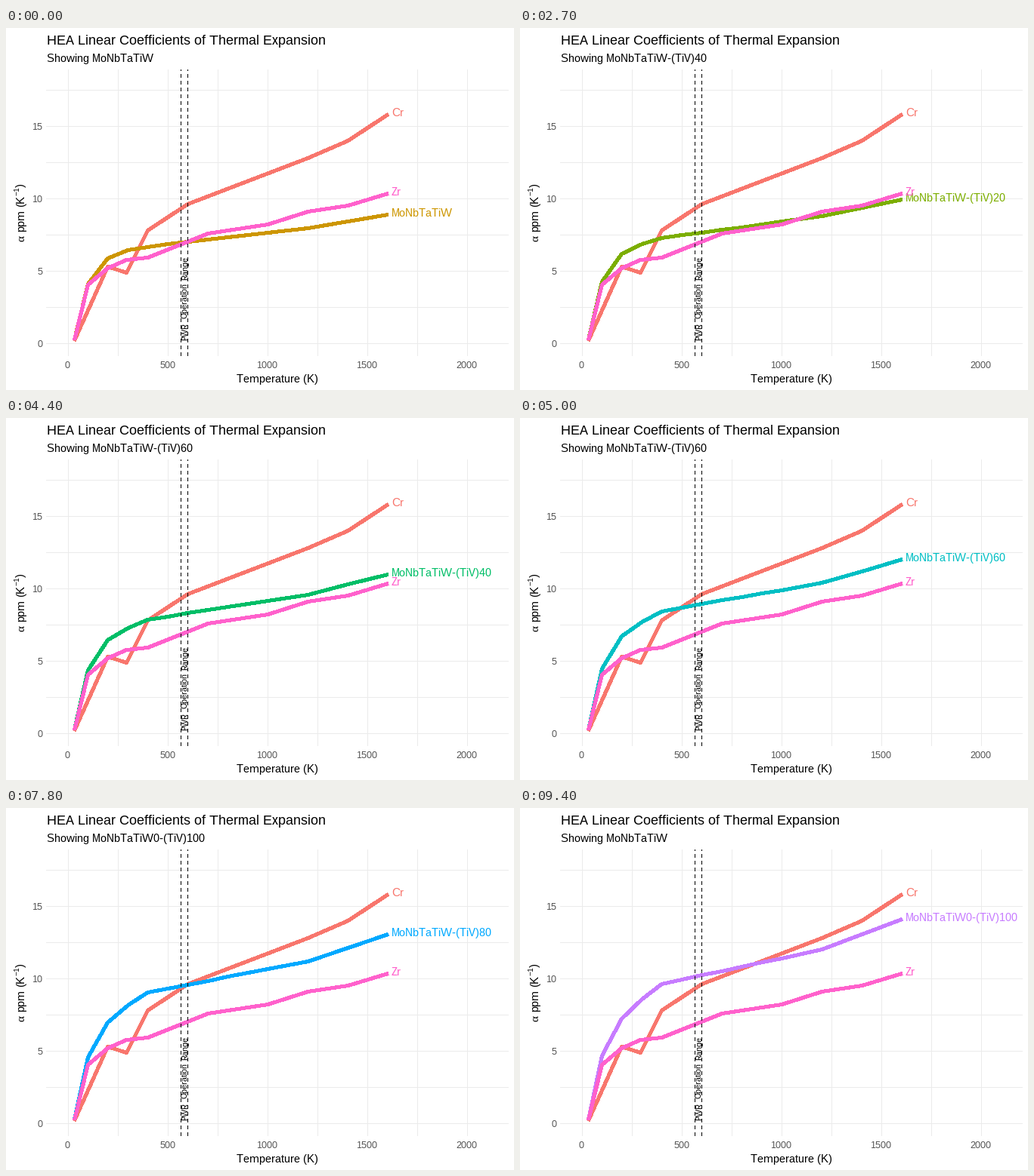
Write a matplotlib script that moves like this. It is 672x480 px and loops after 10000 ms.

```python
import numpy as np
import matplotlib as mpl
import matplotlib.pyplot as plt
from matplotlib.animation import FuncAnimation

mpl.rcParams.update({
    "font.family": "Liberation Sans",
    "text.hinting": "native",
    "text.hinting_factor": 1,
    "text.kerning_factor": 6,
})

W, H, DPI = 672, 480, 96
LEFT, RIGHT, TOP, BOTTOM = 53.8, 664.7, 55, 435
STEP, LOOP = 100, 10000
STAGE, LEAD = 1700, 600  # ms per alloy, and how early the subtitle changes
PX = 72 / DPI            # points per pixel
GREY = "#4D4D4D"

CR = [(30, 0.2), (200, 5.3), (293, 4.9), (400, 7.8),
      (600, 9.6), (1200, 12.8), (1400, 14.0), (1600, 15.8)]
ZR = [(30, 0.25), (100, 4.05), (200, 5.2), (293, 5.75), (400, 5.9),
      (700, 7.6), (1000, 8.2), (1200, 9.1), (1400, 9.5), (1600, 10.35)]

ALLOY_TEMPS = np.r_[30, 100:1001:100, 1200:1601:200]
NAMES = (["MoNbTaTiW"] + [f"MoNbTaTiW-(TiV){p}" for p in range(20, 81, 20)]
         + ["MoNbTaTiW0-(TiV)100"])
COLORS = ["#CD9600", "#7CAE00", "#00BE67", "#00BFC4", "#00A9FF", "#C77CFF"]


def alloy(share):
    """Expansion of the alloy for a TiV share from 0 to 1."""
    t = ALLOY_TEMPS
    rise = t - 30
    hot = np.maximum(0, t - 1200)
    base = 0.25 + 5.85 * (1 - np.exp(-rise / 68)) + 0.0016 * rise + 0.00068 * hot
    gain = (2.95 * np.minimum(1, rise / 370)
            + 0.00135 * np.maximum(0, t - 400) + 0.00163 * hot)
    return base + share * gain


def px_x(kelvin):
    return np.round(LEFT + (np.asarray(kelvin) + 105) / 2310 * (RIGHT - LEFT)) + 0.5


def px_y(alpha):
    return np.round(BOTTOM - (np.asarray(alpha) + 0.9) / 19.8 * (BOTTOM - TOP)) + 0.5


fig = plt.figure(figsize=(W / DPI, H / DPI), dpi=DPI, facecolor="white")
ax = fig.add_axes([0, 0, 1, 1])
ax.set_xlim(0, W)
ax.set_ylim(H, 0)
ax.axis("off")


def text(x, y, s, size, color="black", z=6, **kw):
    """Place text by its baseline, with the size in pixels."""
    return ax.text(x, y, s, fontsize=size * PX, color=color, zorder=z,
                   va="baseline", rotation_mode="anchor", **kw)


def stroke(xs, ys, color, width, z, **kw):
    line, = ax.plot(xs, ys, color=color, lw=width * PX, zorder=z, snap=False,
                    antialiased=False, solid_capstyle="butt",
                    dash_capstyle="butt", solid_joinstyle="round", **kw)
    return line


def series(temps, values, name, color, z):
    line = stroke(px_x(temps), px_y(values), color, 4, z)
    label = text(510, px_y(values[-1]) + 2.5, name, 15, color, z + 5)
    return line, label


# Grid and tick labels
for k in range(0, 2001, 250):
    stroke([px_x(k)] * 2, [TOP, BOTTOM], "#EBEBEB", 1, 0)
    if k % 500 == 0:
        text(px_x(k) - 1, 451, str(k), 12, GREY, ha="center")
for a in np.arange(0, 17.6, 2.5):
    stroke([LEFT, RIGHT], [px_y(a)] * 2, "#EBEBEB", 1, 0)
    if a % 5 == 0:
        text(49, px_y(a) + 4.5, f"{a:.0f}", 12, GREY, ha="right")

# Titles
text(54, 22, "HEA Linear Coefficients of Thermal Expansion", 18)
subtitle = text(54, 45, "", 15)
text(359.3, 470, "Temperature (K)", 15, ha="center")
text(24, 283, "α", 15, rotation=90, family="Liberation Serif")
for y, s in [(270, "ppm"), (237, "(K"), (211, ")")]:
    text(24, y, s, 15, rotation=90)
text(18, 222, "\u22121", 10, rotation=90)

# Curves
series(*zip(*CR), "Cr", "#F8766D", 1)
alloy_line, alloy_label = series(ALLOY_TEMPS, alloy(0), NAMES[0], COLORS[0], 2)
series(*zip(*ZR), "Zr", "#FF61CC", 3)

# Operating range
for k in (565, 600):
    stroke([px_x(k)] * 2, [BOTTOM, TOP], "black", 1, 5, dashes=(4, 4))
for y, word in [(414, "PWR"), (385, "Operation"), (334, "Range")]:
    text(240, y, word, 11, rotation=90)


def stage(t):
    return (t % LOOP + STEP) // STAGE


def update(frame):
    t = frame * STEP
    i = stage(t)
    values = alloy(i / 5)
    alloy_line.set_ydata(px_y(values))
    alloy_line.set_color(COLORS[i])
    alloy_label.set_text(NAMES[i])
    alloy_label.set_color(COLORS[i])
    alloy_label.set_y(px_y(values[-1]) + 2.5)
    subtitle.set_text("Showing " + NAMES[stage(t + LEAD)])
    return alloy_line, alloy_label, subtitle


anim = FuncAnimation(fig, update, frames=LOOP // STEP, interval=STEP,
                     repeat=True, repeat_delay=0, blit=False)
plt.show()
```
